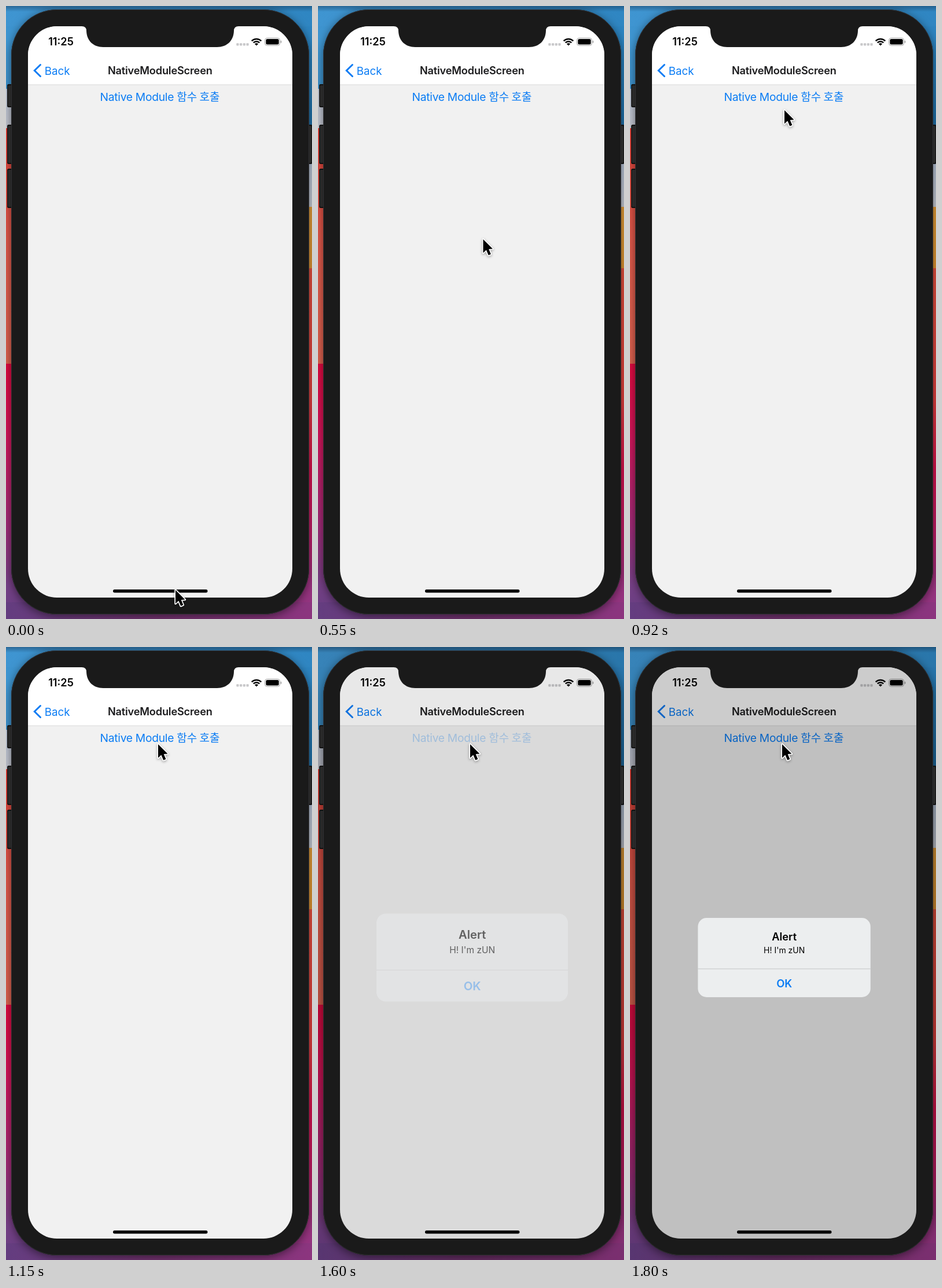
Recreate the animation shown at these times as an HTML page with a canvas. Size 529 px wide and 1059 px high, loop 4.75 s.

```html
<!DOCTYPE html>
<html lang="ko">
<head>
<meta charset="utf-8">
<title>Native module alert</title>
<style>
html, body { margin: 0; width: 100%; height: 100%; overflow: hidden; background: #1a1a1a; }
canvas { display: block; width: 100vw; height: 100vh; }
</style>
</head>
<body>
<canvas id="stage"></canvas>
<script>
const W = 529, H = 1059, LOOP = 4750;
const PRESS = 1200, ALERT = 1600;
const BLUE = '#0a7cf4', INK = '#1b1b1d';
const LATIN = 'Inter, sans-serif';
const KOREAN = '"Noto Sans CJK KR", "Noto Sans CJK", sans-serif';

const canvas = document.getElementById('stage');
const ctx = canvas.getContext('2d');
const ratio = window.devicePixelRatio || 1;
canvas.width = Math.round(W * ratio);
canvas.height = Math.round(H * ratio);

// Pointer tip: [time, x, y], held until the next entry.
const pointerPath = [
  [0, 293, 1009], [50, 281, 937], [400, 262, 694], [450, 262, 508],
  [500, 275, 444], [550, 285.5, 403], [600, 288, 346], [650, 280, 239],
  [700, 273, 211], [750, 268, 197], [800, 267, 189], [850, 267, 183],
  [920, 267, 180], [950, 266, 178], [1000, 265, 175], [1050, 264, 171],
  [1100, 263, 169], [1150, 263, 168]
];

const clamp = v => Math.max(0, Math.min(1, v));
const easeOut = u => 1 - Math.pow(1 - u, 2.4);
const easeInOut = u => u < 0.5 ? 2 * u * u : 1 - 2 * (1 - u) * (1 - u);

function box(x, y, w, h, r, fill) {
  ctx.beginPath();
  ctx.roundRect(x, y, w, h, r);
  ctx.fillStyle = fill;
  ctx.fill();
}

function rect(x, y, w, h, fill) {
  ctx.fillStyle = fill;
  ctx.fillRect(x, y, w, h);
}

function text(str, x, y, size, weight, color, align = 'center', family = LATIN, tracking = 0) {
  ctx.font = `${weight} ${size}px ${family}`;
  ctx.letterSpacing = tracking + 'px';
  ctx.textAlign = align;
  ctx.fillStyle = color;
  ctx.fillText(str, x, y);
  ctx.letterSpacing = '0px';
}

function gradient(x0, y0, x1, y1, length, stops) {
  const g = ctx.createLinearGradient(x0, y0, x1, y1);
  for (const [at, color] of stops) g.addColorStop(at / length, color);
  return g;
}

function wallpaper(dimmed) {
  rect(0, 0, 265, H, gradient(0, 0, 0, H, H, [
    [0, '#3b8fca'], [60, '#3f97d3'], [143, '#3e92cc'], [143, '#b9c2d2'],
    [211, '#c3c6d0'], [211, '#dd4038'], [400, '#e0584a'], [618, '#dc624f'],
    [618, '#e00a40'], [740, '#d3155a'], [900, '#a02b78'], [1000, '#754086'], [H, '#643d80']
  ]));
  rect(265, 0, W - 265, H, gradient(0, 0, 0, H, H, [
    [0, '#2f86c2'], [60, '#2b83c0'], [205, '#1f6fa6'], [272, '#22709f'],
    [272, '#b4c0d3'], [347, '#c3c8d2'], [347, '#e09b38'], [453, '#dd9432'],
    [453, '#e4503f'], [680, '#e0403f'], [800, '#d8124f'], [920, '#bd1f6a'],
    [1000, '#9a3380'], [H, '#8c357f']
  ]));
  rect(0, 0, W, 35, gradient(0, 0, W, 0, W, [[0, '#3f95d1'], [W, '#2f86c2']]));
  rect(0, 1030, W, 29, gradient(0, 0, W, 0, W, [[0, '#643d80'], [265, '#73326f'], [W, '#8c357f']]));
  rect(0, 0, W, 10, gradient(0, 0, 0, 10, 10, [[0, 'rgba(20,50,80,.45)'], [10, 'rgba(20,50,80,0)']]));
  if (dimmed) rect(0, 0, W, H, 'rgba(0,0,0,.12)');
}

function sideButton(x, y, h) {
  box(x, y, 10, h, 2.5, '#151515');
  box(x + 1.5, y + 2, 7, h - 4, 1.5, '#323232');
}

function phoneBody() {
  sideButton(2, 135, 40);
  sideButton(2, 205, 68);
  sideButton(2, 281, 68);
  sideButton(519.5, 205, 68);
  ctx.save();
  ctx.shadowColor = 'rgba(0,0,0,.5)';
  ctx.shadowBlur = 16 * ratio;
  ctx.shadowOffsetY = 3 * ratio;
  box(9, 6, 515, 1045, 79, '#1a1a1a');
  ctx.restore();
  ctx.beginPath();
  ctx.roundRect(9.5, 6.5, 514, 1044, 78.5);
  ctx.strokeStyle = '#303033';
  ctx.lineWidth = 1;
  ctx.stroke();
}

function notch() {
  ctx.beginPath();
  ctx.moveTo(131, 34);
  ctx.lineTo(131, 35);
  ctx.quadraticCurveTo(139, 35, 139, 43);
  ctx.bezierCurveTo(139.5, 60, 151, 71, 168, 71);
  ctx.lineTo(365, 71);
  ctx.bezierCurveTo(382, 71, 393.5, 60, 394, 43);
  ctx.quadraticCurveTo(394, 35, 402, 35);
  ctx.lineTo(402, 34);
  ctx.closePath();
  ctx.fillStyle = '#1a1a1a';
  ctx.fill();
}

function statusBar() {
  text('11:25', 95, 68, 18.2, 600, '#000');
  for (let i = 0; i < 4; i++) box(398.3 + i * 5.7, 64.3, 4.2, 4.2, 1, '#c8c8ca');

  const cx = 433, cy = 68.6, from = -Math.PI * 0.75, to = -Math.PI * 0.25;
  ctx.fillStyle = ctx.strokeStyle = '#000';
  ctx.beginPath();
  ctx.moveTo(cx, cy);
  ctx.arc(cx, cy, 4.4, from, to);
  ctx.fill();
  ctx.lineWidth = 2.5;
  for (const r of [7.4, 11.7]) {
    ctx.beginPath();
    ctx.arc(cx, cy, r, from, to);
    ctx.stroke();
  }

  ctx.beginPath();
  ctx.roundRect(447.5, 55.3, 26, 13, 4);
  ctx.strokeStyle = '#a0a0a0';
  ctx.lineWidth = 1;
  ctx.stroke();
  box(449.3, 57.1, 22.4, 9.4, 2.5, '#000');
  box(474.8, 59.8, 1.5, 4.2, 1, '#a0a0a0');
}

function navBar() {
  rect(38, 35, 457, 101, '#fff');
  rect(38, 135.5, 457, 1, '#d9d9da');
  statusBar();
  ctx.beginPath();
  ctx.moveTo(59.5, 101.5);
  ctx.lineTo(49.3, 111.5);
  ctx.lineTo(59.5, 121.5);
  ctx.strokeStyle = BLUE;
  ctx.lineWidth = 3;
  ctx.lineCap = 'round';
  ctx.stroke();
  ctx.lineCap = 'butt';
  text('Back', 66.7, 118.5, 18.8, 400, BLUE, 'left');
  text('NativeModuleScreen', 266.3, 118.3, 18.2, 600, INK, 'center', LATIN, -0.2);
}

function callButton(alpha) {
  ctx.globalAlpha = alpha;
  text('Native Module', 162.5, 164, 19.3, 400, BLUE, 'left', LATIN, -0.3);
  text('함수 호출', 295.2, 164, 19, 400, BLUE, 'left', KOREAN);
  ctx.globalAlpha = 1;
}

function alertBox(p) {
  const cx = 266.7, cy = 536.4, scale = 1.2 - 0.2 * p;
  ctx.save();
  ctx.translate(cx, cy);
  ctx.scale(scale, scale);
  ctx.translate(-cx, -cy);
  ctx.globalAlpha = p;
  box(117.4, 468, 298.4, 137, 15, '#eceeef');
  rect(117.4, 555.5, 298.4, 1, '#c3c5c6');
  ctx.globalAlpha = Math.pow(p, 0.7);
  text('Alert', cx, 507.3, 18.2, 600, '#000');
  text("H! I'm zUN", cx, 529.3, 14, 400, '#000');
  ctx.globalAlpha = Math.pow(p, 1.35);
  text('OK', cx, 587.5, 18.4, 600, BLUE);
  ctx.restore();
}

function pointer(x, y) {
  ctx.save();
  ctx.translate(x, y);
  ctx.beginPath();
  ctx.moveTo(0, 0);
  for (const [px, py] of [[0, 23.5], [5.4, 18.6], [9.2, 27.6], [13.4, 25.8], [9.7, 17], [16.5, 16.6]]) {
    ctx.lineTo(px, py);
  }
  ctx.closePath();
  ctx.lineWidth = 3.4;
  ctx.lineJoin = 'round';
  ctx.strokeStyle = '#fff';
  ctx.shadowColor = 'rgba(0,0,0,.35)';
  ctx.shadowBlur = 4 * ratio;
  ctx.shadowOffsetY = 1.5 * ratio;
  ctx.stroke();
  ctx.shadowColor = 'transparent';
  ctx.fillStyle = '#000';
  ctx.fill();
  ctx.restore();
}

function draw(t) {
  const pressed = t >= PRESS;
  const step = Math.floor(t / 50) * 50;
  const u = t < ALERT ? 0 : clamp((step - 1545) / 250);
  const shown = easeOut(u);
  const buttonAlpha = pressed ? 0.2 + 0.8 * easeInOut(u) : 1;

  ctx.setTransform(canvas.width / W, 0, 0, canvas.height / H, 0, 0);
  wallpaper(pressed);
  phoneBody();

  ctx.save();
  ctx.beginPath();
  ctx.roundRect(38, 35, 457, 987, 50);
  ctx.clip();
  rect(38, 35, 457, 987, pressed ? '#f0f0f0' : '#f1f1f1');
  navBar();
  callButton(buttonAlpha);
  if (shown > 0) {
    rect(38, 35, 457, 987, `rgba(0,0,0,${0.2 * shown})`);
    alertBox(shown);
  }
  box(185, 1008, 163.5, 5.4, 2.7, '#000');
  ctx.restore();

  notch();
  const [, x, y] = pointerPath.findLast(p => p[0] <= t);
  pointer(x, y);
}

const start = performance.now();
function tick() {
  draw((performance.now() - start) % LOOP);
  requestAnimationFrame(tick);
}
tick();
</script>
</body>
</html>
```
